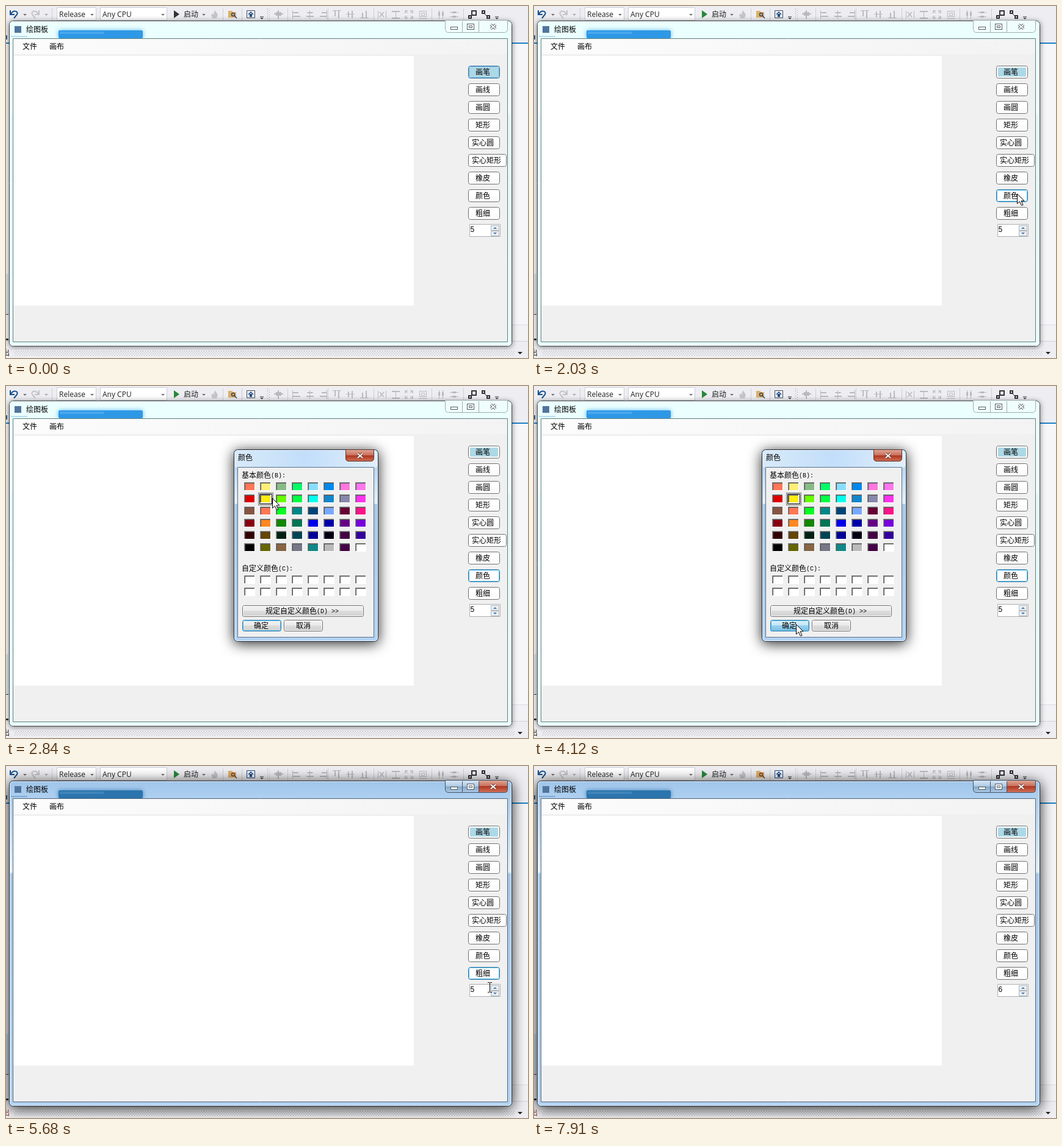
These frames come from a looping animation (855x578 px, 8000 ms). An HTML page with a canvas:

```html
<!DOCTYPE html>
<html lang="zh">
<head>
<meta charset="utf-8">
<title>绘图板</title>
<style>
html, body { margin: 0; width: 100%; height: 100%; overflow: hidden; background: #eeeef2; }
canvas { display: block; }
</style>
</head>
<body>
<canvas id="stage" width="855" height="578"></canvas>
<script>
const W = 855, H = 578, LOOP = 8000;
const screen = document.getElementById('stage').getContext('2d');
const layer = document.createElement('canvas');
layer.width = W;
layer.height = H;
const layerCtx = layer.getContext('2d');
let g = screen;

const CJK = '"Noto Sans CJK SC", "Noto Sans CJK", sans-serif';
const LATIN = '"Open Sans", sans-serif';
const MONO = '"Liberation Mono", monospace';

// Drawing helpers
function box(x, y, w, h, fill) {
  g.fillStyle = fill;
  g.fillRect(x, y, w, h);
}

function frame(x, y, w, h, color, r = 0) {
  g.strokeStyle = color;
  g.lineWidth = 1;
  g.beginPath();
  g.roundRect(x + .5, y + .5, w - 1, h - 1, r);
  g.stroke();
}

function round(x, y, w, h, r, fill) {
  g.fillStyle = fill;
  g.beginPath();
  g.roundRect(x, y, w, h, r);
  g.fill();
}

function poly(points, fill, stroke, width = 1) {
  g.beginPath();
  points.forEach(([x, y], i) => i ? g.lineTo(x, y) : g.moveTo(x, y));
  if (fill) {
    g.closePath();
    g.fillStyle = fill;
    g.fill();
  }
  if (stroke) {
    g.strokeStyle = stroke;
    g.lineWidth = width;
    g.stroke();
  }
}

function label(s, x, y, color = '#000', font = CJK, size = 12) {
  g.font = size + 'px ' + font;
  g.fillStyle = color;
  g.fillText(s, x, y);
}

function fade(x0, y0, x1, y1, ...stops) {
  const grad = g.createLinearGradient(x0, y0, x1, y1);
  stops.forEach(([at, color]) => grad.addColorStop(at, color));
  return grad;
}

function shadow(color, blur, dy, draw) {
  g.save();
  g.shadowColor = color;
  g.shadowBlur = blur;
  g.shadowOffsetY = dy;
  draw();
  g.restore();
}

const drop = (x, y, color = '#717171') => poly([[x - 3, y], [x + 3, y], [x, y + 3]], color);

// Toolbar of the application behind
function hookArrow(x, dir, color) {
  g.save();
  g.translate(x, 0);
  g.scale(dir, 1);
  poly([[-6, 7], [-6, 14], [1, 14]], null, color, 2);
  g.beginPath();
  g.moveTo(-5, 13);
  g.bezierCurveTo(-1, 6, 8, 8, 5, 14);
  g.lineTo(0, 20);
  g.stroke();
  g.restore();
}

function alignIcon(x, where, flip) {
  g.save();
  g.translate(x, 14);
  if (flip) g.transform(0, 1, 1, 0, 0, 0);
  const grey = '#b9bac1';
  box(where * 6 - 1, -7, 1, 14, grey);
  [[9, -4], [12, 2]].forEach(([w, y]) => box(where < 0 ? -6 : where > 0 ? 6 - w : -w / 2, y, w, 2, grey));
  g.restore();
}

function backdrop(started, active) {
  const grey = '#b9bac1';
  box(0, 0, W, H, '#eeeef2');
  box(0, 62, W, 488, '#f6f6f8');
  box(0, 60, W, 2, '#1a7fc4');
  box(826, 523, 29, 1, '#dddde2');
  box(826, 524, 29, 26, '#f2f2f5');
  box(0, 550, W, 1, '#d0d1da');
  box(0, 440, 4, 66, '#d5e4ee');
  box(0, 506, 4, 1, '#303842');
  box(0, 546, 4, 3, '#303842');
  box(0, 48, 2, 7, '#355f86');

  hookArrow(13, 1, '#14508c');
  drop(31, 13);
  hookArrow(48, -1, '#c2c3c9');
  drop(66, 13, '#aaa');
  [75, 355, 386, 461, 527, 602, 697, 749].forEach(x => box(x, 4, 1, 20, '#cccedb'));
  [[83, 65], [154, 110]].forEach(([x, w]) => {
    box(x, 2, w, 22, '#fff');
    frame(x, 2, w, 22, '#cccedb');
    drop(x + w - 7, 13);
  });
  label('Release', 87, 18, '#1e1e1e', LATIN);
  label('Any CPU', 158, 18, '#1e1e1e', LATIN);
  poly([[275, 7], [284, 13.5], [275, 20]], started ? '#26883a' : '#333');
  label('启动', 291, 18, '#1e1e1e');
  drop(324, 13);
  poly([[342, 7], [347, 14], [345, 20], [338, 20], [336, 15], [339, 12], [340, 14]], '#c5c6cb');

  poly([[364, 8], [370, 8], [372, 10], [377, 10], [377, 19], [364, 19]], '#dcb067');
  g.strokeStyle = active ? '#7d4030' : '#354a63';
  g.lineWidth = 1.5;
  g.beginPath();
  g.arc(372, 14, 2.5, 0, 7);
  g.moveTo(374, 16);
  g.lineTo(378, 20);
  g.stroke();
  frame(394, 7, 14, 13, active ? '#1d4c86' : '#424c5a');
  poly([[397, 14], [401, 10], [405, 14]], null, '#1d4c86', 1.5);
  box(399, 13, 4, 5, '#1d4c86');
  [419, 804].forEach(x => {
    box(x - 3, 17, 6, 1, '#555');
    drop(x, 19, '#555');
  });
  for (let y = 4; y < 24; y += 4) {
    box(428, y, 1, 1, '#999');
    box(431, y + 2, 1, 1, '#999');
  }

  box(445, 7, 2, 14, grey);
  box(439, 12, 15, 2, grey);
  box(442, 10, 9, 6, grey);
  [476, 498, 520].forEach((x, i) => alignIcon(x, i - 1, false));
  [542, 564, 587].forEach((x, i) => alignIcon(x, i - 1, true));
  box(609, 8, 1, 12, grey);
  box(622, 8, 1, 12, grey);
  poly([[612, 10], [619, 18]], null, grey, 1.5);
  poly([[619, 10], [612, 18]], null, grey, 1.5);
  box(632, 8, 13, 2, grey);
  box(632, 19, 13, 2, grey);
  box(638, 9, 1, 11, grey);
  for (const sx of [-1, 1]) for (const sy of [-1, 1]) {
    const at = (x, y) => [660 + sx * x, 14 + sy * y];
    poly([at(2, 6), at(6, 6), at(6, 2)], null, grey, 1.5);
    poly([at(2, 2), at(6, 6)], null, grey);
  }
  frame(677, 8, 12, 10, grey);
  frame(680, 11, 6, 5, grey);
  box(676, 20, 14, 1, grey);
  [709, 715].forEach(x => {
    box(x, 7, 1, 14, grey);
    box(x - 1, 10, 3, 6, grey);
  });
  [10, 17].forEach(y => {
    box(727, y, 14, 1, grey);
    box(731, y - 1, 6, 3, grey);
  });
  g.strokeStyle = '#333';
  g.lineWidth = 2;
  g.strokeRect(763, 8, 7, 7);
  g.strokeRect(758, 16, 4, 4);
  g.strokeRect(780, 8, 4, 4);
  g.strokeRect(788, 16, 4, 4);
  poly([[783, 12], [788, 17]], null, '#333', 1);

  for (let y = 567; y < 574; y += 2)
    for (let x = 14 + (y % 4 === 1 ? 0 : 2); x < 834; x += 4) box(x, y, 1, 1, '#a5a6ae');
  label('出', -6, 574, active ? '#8d3325' : '#1e1e1e');
  poly([[838, 568], [846, 568], [842, 572]], '#222');
}

// Window parts
function glass(x, y, w, h, active) {
  const fill = active
    ? fade(0, y, 0, y + h, [0, '#9fc5ea'], [.06, '#b0d1f1'], [.28, '#e2effc'], [.287, '#a5c8ea'], [1, '#b4d4f4'])
    : fade(0, y, 0, y + h, [0, '#eafffe'], [.28, '#f2ffff'], [.29, '#e3fbfa'], [1, '#e9fffd']);
  const body = () => round(x, y, w, h, 6, fill);
  if (active) shadow('rgba(0,0,0,.85)', 22, 3, body);
  else shadow('rgba(0,0,0,.5)', 9, 1, body);
  frame(x, y, w, h, active ? '#202a35' : '#3d4848', 6);
  frame(x + 1, y + 1, w - 2, h - 2, 'rgba(255,255,255,.75)', 5);
}

function closeMark(x, y, fill, edge) {
  const arms = [[[x - 4, y - 3], [x + 4, y + 4]], [[x + 4, y - 3], [x - 4, y + 4]]];
  arms.forEach(p => poly(p, null, edge, 4));
  arms.forEach(p => poly(p, null, fill, 2));
}

const red = y => fade(0, y, 0, y + 19, [0, '#e0a494'], [.45, '#c9705c'], [.48, '#ad351d'], [1, '#d0705a']);

function caption(active) {
  const edge = active ? '#405369' : '#a0adad';
  if (active) {
    round(719, 24, 103, 20, [0, 0, 5, 5], fade(0, 24, 0, 44, [0, '#d5e5f5'], [.45, '#b2cbe3'], [.5, '#86a7c7'], [1, '#aecbe6']));
    round(775, 24, 47, 20, [0, 0, 5, 0], red(24));
  } else round(719, 24, 103, 20, [0, 0, 5, 5], '#f0fdfd');
  frame(719, 23, 103, 21, edge, [0, 0, 5, 5]);
  box(747, 25, 1, 18, edge);
  box(774, 25, 1, 18, edge);
  const ink = '#515c66';
  box(728, 34, 12, 5, ink);
  box(729, 35, 10, 3, '#fff');
  box(755, 29, 12, 10, ink);
  box(756, 30, 10, 8, '#fff');
  frame(758, 32, 6, 4, ink);
  closeMark(798, 33.5, '#fff', active ? '#6b3a35' : ink);
}

function button(x, y, w, text, tx, lit, tint) {
  round(x, y, w, 21, 3, '#fff');
  if (tint) box(x + (lit ? 2 : 3), y + (lit ? 2 : 3), w - (lit ? 4 : 6), lit ? 17 : 15, tint);
  else box(x + 2, y + 11, w - 4, 8, '#fbfbfb');
  frame(x, y, w, 21, lit ? '#3878a8' : '#707070', 3);
  if (lit) frame(x + 1, y + 1, w - 2, 19, tint ? '#6aa9d4' : '#55c0ea', 2);
  label(text, tx, y + 15);
}

const tools = ['画笔', '画线', '画圆', '矩形', '实心圆', '实心矩形', '橡皮', '颜色', '粗细'];

function focusAt(t) {
  if (t < 1920) return 0;
  if (t < 5290) return 7;
  return t < 6450 ? 8 : -1;
}

function numberBox(t) {
  box(759, 358, 51, 21, '#fff');
  frame(759, 358, 51, 21, '#abadb3');
  const selected = t >= 6500 && t < 7360;
  if (selected) box(760, 360, 8, 13, '#3399ff');
  label(t < 7360 ? '5' : '6', 760.5, 371, selected ? '#fff' : '#000', '"Liberation Sans", Arial, sans-serif');
  if (t >= 6680 && t < 7070) box(761, 360, 1, 12, '#000');
  if (t >= 7360 && t < 7910) box(767, 360, 1, 12, '#000');
  [360, 369].forEach((y, i) => {
    box(794, y, 14, 9, '#eaeef2');
    frame(794, y, 14, 9, '#b0b5bb');
    const a = i ? y + 3 : y + 6, b = i ? y + 6 : y + 3;
    poly([[798, a], [804, a], [801, b]], '#4c7ba6');
  });
}

function mainWindow(t, active, cursor) {
  glass(5, 24, 824, 535, active);
  const tab = active ? '#2c74ad' : '#2f98e6';
  shadow(active ? '#3b80b8' : '#55b5f5', 7, 0, () => round(86, 40, 138, 13, 2, tab));
  box(88, 42, 72, 4, active ? '#3f85bb' : '#48a8ee');
  box(8, 49, 27, 2, active ? '#7fa9d0' : '#b8def5');
  box(14, 33, 11, 11, '#52749c');
  label('绘图板', 33, 43);
  caption(active);

  box(11, 53, 811, 499, '#f0f0f0');
  box(12, 54, 809, 25, fade(12, 0, 821, 0, [0, '#fcfcfc'], [1, '#f3f3f3']));
  frame(11, 53, 811, 499, active ? '#506478' : '#5c7f7e');
  label('文件', 27, 71);
  label('画布', 71, 71);
  box(12, 82, 656, 410, '#fff');

  const focus = focusAt(t);
  tools.forEach((name, i) => {
    const y = 98 + 29 * i, w = i === 5 ? 63 : 52;
    const hover = cursor && !cursor.beam && cursor.x >= 757 && cursor.x < 757 + w && cursor.y >= y && cursor.y < y + 21;
    button(757, y, w, name, (i === 5 ? 787 : 781) - name.length * 6, i === focus || hover, i ? null : '#add8e6');
  });
  numberBox(t);
}

// Colour dialog
const palette = [
  'f75 fe7 8b8 0f6 8df 08e f7d f7e', 'd00 fe1 6f0 0f4 0fe 18c 88a f3e',
  '854 f75 0f2 088 047 7af 603 f18', '801 f82 180 075 00e 00a 608 70d',
  '300 640 021 045 009 001 404 309', '000 660 864 778 188 bbb 404 fff'
].map(row => row.split(' '));

function swatch(col, y, fill) {
  const x = 390 + col * 26;
  box(x, y, 18, 14, '#fff');
  box(x, y, 17, 13, '#8a8a8a');
  box(x + 1, y + 1, 16, 12, '#555');
  box(x + 2, y + 2, 15, 11, fill);
}

function dialogButton(x, y, w, text, tx, lit, pressed) {
  round(x, y, w, 19, 3, fade(0, y, 0, y + 19, [0, '#f3f3f3'], [.48, '#ebebeb'], [.5, '#dddddd'], [1, '#cfcfcf']));
  if (pressed) round(x, y, w, 19, 3, fade(0, y, 0, y + 19, [0, '#e0f2fc'], [.48, '#c4e5f6'], [.5, '#98d1ef'], [1, '#78bce0']));
  frame(x, y, w, 19, lit ? '#3c7fb1' : '#707070', 3);
  frame(x + 1, y + 1, w - 2, 17, lit ? '#55c0ea' : '#fbfbfb', 2);
  label(text, tx, y + 14);
}

function dialog(t) {
  glass(373, 104, 237, 316, true);
  round(375, 106, 233, 28, 4, fade(375, 0, 608, 0, [0, '#d8eaf9'], [.5, '#c2defa'], [1, '#e1effb']));
  label('颜色', 380, 122);
  round(556, 105, 47, 19, [0, 0, 5, 5], red(105));
  frame(556, 104, 47, 20, '#5d3530', [0, 0, 5, 5]);
  closeMark(580, 114, '#fff', '#6b3a35');
  box(379, 133, 224, 280, '#f0f0f0');
  frame(379, 133, 224, 280, '#56708a');

  label('基本颜色', 386, 151);
  label('(B):', 434, 150, '#000', MONO, 10);
  palette.forEach((row, j) => row.forEach((color, i) => swatch(i, 158 + j * 20, '#' + color)));
  frame(415, 177, 21, 17, '#000');
  g.setLineDash([1, 1]);
  frame(413, 175, 25, 21, '#000');
  g.setLineDash([]);
  label('自定义颜色', 386, 304);
  label('(C):', 446, 303, '#000', MONO, 10);
  for (let i = 0; i < 16; i++) swatch(i % 8, i < 8 ? 311 : 331, '#fff');

  dialogButton(387, 360, 199, '规定自定义颜色', 425, false);
  label('(D) >>', 509, 373, '#000', MONO, 10);
  dialogButton(387, 384, 64, '确定', 406, true, t >= 3740);
  dialogButton(455, 384, 64, '取消', 475, false);
}

// Away is 0 when fully open, 1 when gone; the sheet tilts back as it fades.
function showDialog(t, away) {
  g = layerCtx;
  g.clearRect(0, 0, W, H);
  dialog(t);
  g = screen;
  if (!away) {
    g.drawImage(layer, 0, 0);
    return;
  }
  g.save();
  g.globalAlpha = 1 - away;
  for (let row = 80; row < 455; row++) {
    let y = row, s = 1;
    for (let i = 0; i < 5; i++) {
      s = 1 - .062 * away + .0003 * away * (y - 265);
      y = 265 + (row - 265) / s;
    }
    const x = 491 - 2 * away - 151 * s;
    g.drawImage(layer, 340, y, 302, 1, x, row, 302 * s, 1);
  }
  g.restore();
}

// Pointer path: time, x, y
const path = [
  [280, 700, 574], [430, 768, 340], [560, 778, 135], [640, 768, 113], [850, 620, 210], [1070, 537, 200],
  [1130, 690, 240], [1205, 847, 317], [1290, 847, 317], [1420, 838, 352], [1590, 808, 340], [1770, 791, 308],
  [2250, 791, 308], [2450, 640, 250], [2700, 467, 194], [2780, 446, 188], [2835, 436, 184], [2910, 436, 184],
  [2930, 428, 180], [3080, 430, 186], [3350, 447, 280], [3740, 429, 391], [4450, 429, 391], [4680, 640, 350],
  [4900, 822, 309], [4970, 815, 325], [5130, 786, 338], [5400, 786, 338], [5670, 792, 363], [5750, 792, 363],
  [5820, 795, 368], [5970, 793, 371], [6120, 791, 372], [6220, 791, 372], [6290, 788, 371], [6450, 780, 371],
  [6560, 740, 374], [6680, 751, 379], [7360, 751, 379]
];

function cursorAt(t) {
  if (t < 280 || t >= 7360) return null;
  const i = path.findIndex(p => p[0] > t);
  const [t0, x0, y0] = path[i - 1], [t1, x1, y1] = path[i];
  const k = (t - t0) / (t1 - t0);
  const x = Math.round(x0 + (x1 - x0) * k), y = Math.round(y0 + (y1 - y0) * k);
  const beam = t >= 6450 || (x >= 760 && x <= 792 && y >= 359 && y < 379);
  return { x, y, beam };
}

function drawCursor({ x, y, beam }) {
  if (beam) {
    box(x, y - 7, 1, 15, '#000');
    [-8, 8].forEach(d => {
      box(x - 3, y + d, 3, 1, '#000');
      box(x + 1, y + d, 3, 1, '#000');
    });
    return;
  }
  const shape = [[0, 0], [0, 16], [4, 12.5], [7, 19], [9.5, 18], [6.5, 11.5], [11.5, 11.5], [0, 0]];
  poly(shape.map(([dx, dy]) => [x + dx + .5, y + dy + .5]), '#fff', '#000');
}

function dialogAway(t) {
  const clamp = v => Math.min(1, Math.max(0, v));
  return t < 4000 ? 1 - clamp((t - 2110) / 230) : clamp((t - 4200) / 245);
}

function render(t) {
  g = screen;
  g.clearRect(0, 0, W, H);
  const active = t >= 4200, cursor = cursorAt(t);
  backdrop(t >= 1920, active);
  mainWindow(t, active, cursor);
  const away = dialogAway(t);
  if (away < 1) showDialog(t, away);
  if (cursor) drawCursor(cursor);
}

const start = performance.now();
function tick() {
  render((performance.now() - start) % LOOP);
  requestAnimationFrame(tick);
}
tick();
</script>
</body>
</html>
```
